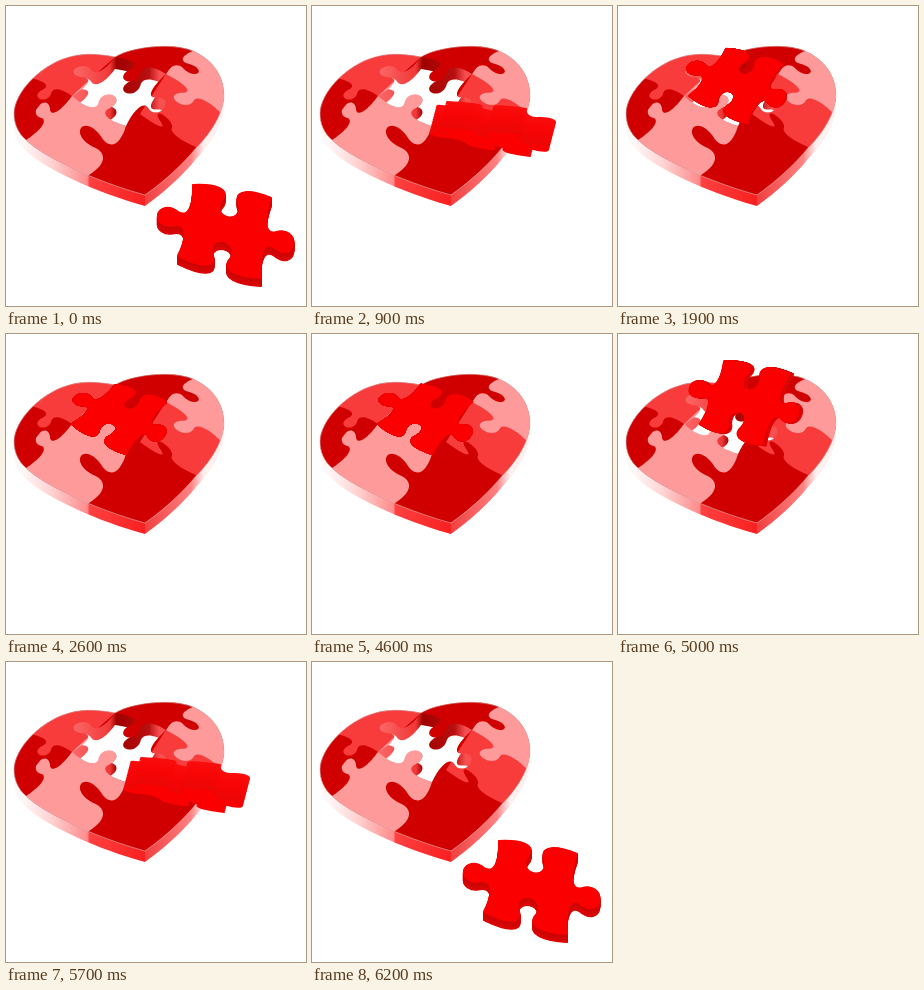
Recreate the animation shown at these times as an HTML page. Size 300x300 px, loop 8200 ms.

```html
<!DOCTYPE html>
<html lang="en">
<head>
<meta charset="utf-8">
<title>Heart puzzle</title>
<style>
html, body { margin: 0; width: 100%; height: 100%; overflow: hidden; background: #fff; }
svg { display: block; width: 100vw; height: 100vh; }
</style>
</head>
<body>
<svg viewBox="0 0 300 300">
  <defs>
    <path id="heart" d="M109,51 C90,47 72,47 57,53 C33,62 9,86 8,107 C8,118 12,127 20,134 C36,150 88,175 139,189 C160,174 178,157 190,142 C205,127 217,108 218,90 C218,68 205,53 187,45 C165,36 125,41 109,51Z"/>
    <path id="hole"/>
    <clipPath id="inHeart"><use href="#heart"/></clipPath>
    <clipPath id="inHole"><use href="#hole"/></clipPath>
    <linearGradient id="rim" gradientUnits="userSpaceOnUse" x1="0" x2="220">
      <stop offset=".08" stop-color="#fff6f6"/>
      <stop offset=".2" stop-color="#ffd4d4"/>
      <stop offset=".37" stop-color="#ff8c8c"/>
      <stop offset=".38" stop-color="#ff4040"/>
      <stop offset=".631" stop-color="#f82020"/>
      <stop offset=".632" stop-color="#f04040"/>
      <stop offset=".84" stop-color="#ff8080"/>
      <stop offset=".9" stop-color="#fff0f0"/>
    </linearGradient>
    <linearGradient id="wall" gradientUnits="userSpaceOnUse" x1="60" x2="170">
      <stop offset="0" stop-color="#ff7070"/>
      <stop offset=".4" stop-color="#f03838"/>
      <stop offset=".46" stop-color="#a00000"/>
      <stop offset=".75" stop-color="#b81010"/>
      <stop offset=".85" stop-color="#f85050"/>
    </linearGradient>
  </defs>
  <use href="#heart" y="11" fill="url(#rim)"/>
  <g id="tiles" clip-path="url(#inHeart)"></g>
  <use href="#heart" fill="none" stroke="#d8b8b8" stroke-width=".6"/>
  <use href="#hole" fill="url(#wall)"/>
  <g clip-path="url(#inHole)"><use href="#hole" y="12" fill="#fff"/></g>
  <g id="piece" stroke-linejoin="round" stroke-width="2"></g>
</svg>
<script>
const mix = (a, b, p) => a.map((v, k) => v + (b[k] - v) * p);
const byId = id => document.getElementById(id);

function addPath(parent, fill, d) {
  const el = document.createElementNS('http://www.w3.org/2000/svg', 'path');
  el.setAttribute('fill', fill);
  if (d) el.setAttribute('d', d);
  byId(parent).append(el);
  return el;
}

// Half of a jigsaw tab: along the edge, and out towards the tip
const half = [[.3, -.2], [.45, -.05], [.41, .3], [.33, .7], [.4, 1], [.5, 1]];
const tab = [...half, ...half.slice(0, -1).reverse().map(([x, y]) => [1 - x, y]), [1, 0]];

// Curve points of a seam from p to q whose tab reaches to tip
function seam(p, q, tip) {
  const base = mix(p, q, .5);
  return tab.map(([x, y]) => mix(p, q, x).map((v, k) => v + y * (tip[k] - base[k])));
}

const curve = pts => 'C' + pts.join(' ');

// Piece on the unit square: tabs left and right, sockets top and bottom
const h = .34;
const unit = [
  ...seam([0, 0], [1, 0], [.5, h]), ...seam([1, 0], [1, 1], [1 + h, .5]),
  ...seam([1, 1], [0, 1], [.5, 1 - h]), ...seam([0, 1], [0, 0], [-h, .5])
];

function outline([ax, ay, bx, by, cx, cy, dx, dy]) {
  const pts = unit.map(([u, v]) => mix(mix([ax, ay], [bx, by], u), mix([dx, dy], [cx, cy], u), v));
  return `M${ax},${ay}${curve(pts)}Z`;
}

// Pose: four corners clockwise from the top left, then the thickness vector
const rest = [187, 179, 265, 192, 255, 272, 172, 250, 0, 8];
const flat = [128, 123, 207, 130, 218, 150, 158, 139, 7, -27];
const tilt = [125, 75, 205, 77, 214, 153, 144, 139, 8, -6];
const upright = [104, 10, 180, 19, 162, 104, 93, 90, 6, 1];
const seated = [109, 51, 160, 68, 120, 120, 66, 90, 0, 0];

const dark = '#d00000', red = '#f83c3c', pink = '#ff9a9a';
const joint = (p, q, tip, rest) => `M${p}${curve(seam(p, q, tip))}L${rest}Z`;

addPath('tiles', dark, 'M0,0H300V300H0Z');
addPath('tiles', pink, joint([120, 120], [83, 169], [75, 122], '40,190 0,140 66,60 130,80'));
addPath('tiles', dark, joint([66, 90], [20, 134], [33, 99], '0,140 0,60 66,60'));
addPath('tiles', red, joint([24, 72], [66, 90], [34, 93], '90,68 109,51 109,30 10,30'));
addPath('tiles', red, joint([134, 108], [190, 141], [157, 109], '240,140 240,60 160,68'));
addPath('tiles', pink, joint([160, 68], [216, 108], [171, 96], '240,100 240,30 187,30'));
addPath('tiles', dark, joint([160, 68], [187, 45], [192, 67], '195,20 109,40 109,51 118,85'));
byId('hole').setAttribute('d', outline(seated));

const linear = p => p;
const easeIn = p => p ** 3;
const easeOut = p => 1 - (1 - p) ** 3;
const keys = [
  [0, rest], [400, rest, linear], [900, flat, linear], [1200, tilt, linear], [1400, upright, linear],
  [2600, seated, easeOut], [4500, seated, linear], [5100, upright, easeIn], [5400, tilt, linear],
  [5700, flat, linear], [6200, rest, linear], [8200, rest, linear]
];

function poseAt(t) {
  const i = keys.findIndex(k => k[0] > t);
  const [t0, from] = keys[i - 1], [t1, to, ease] = keys[i];
  return mix(from, to, ease((t - t0) / (t1 - t0)));
}

// Stacked copies give the piece its thickness; the last one is its face
const count = 16;
const layers = Array.from({ length: count + 1 }, () => addPath('piece', 'none'));

function draw(t) {
  const pose = poseAt(t), [ex, ey] = pose.slice(8), d = outline(pose);
  layers.forEach((el, i) => {
    const k = 1 - i / count;
    const color = k ? `hsl(0 95% ${42 - ey * .2 + k * 4}%)` : '#fb0000';
    el.setAttribute('d', d);
    el.setAttribute('fill', color);
    el.setAttribute('stroke', color);
    el.setAttribute('transform', `translate(${ex * k} ${ey * k})`);
  });
}

const start = performance.now();
function tick() {
  const t = (performance.now() - start) % 8200;
  draw(Math.floor(t / 100) * 100);
  requestAnimationFrame(tick);
}
draw(0);
requestAnimationFrame(tick);
</script>
</body>
</html>
```
